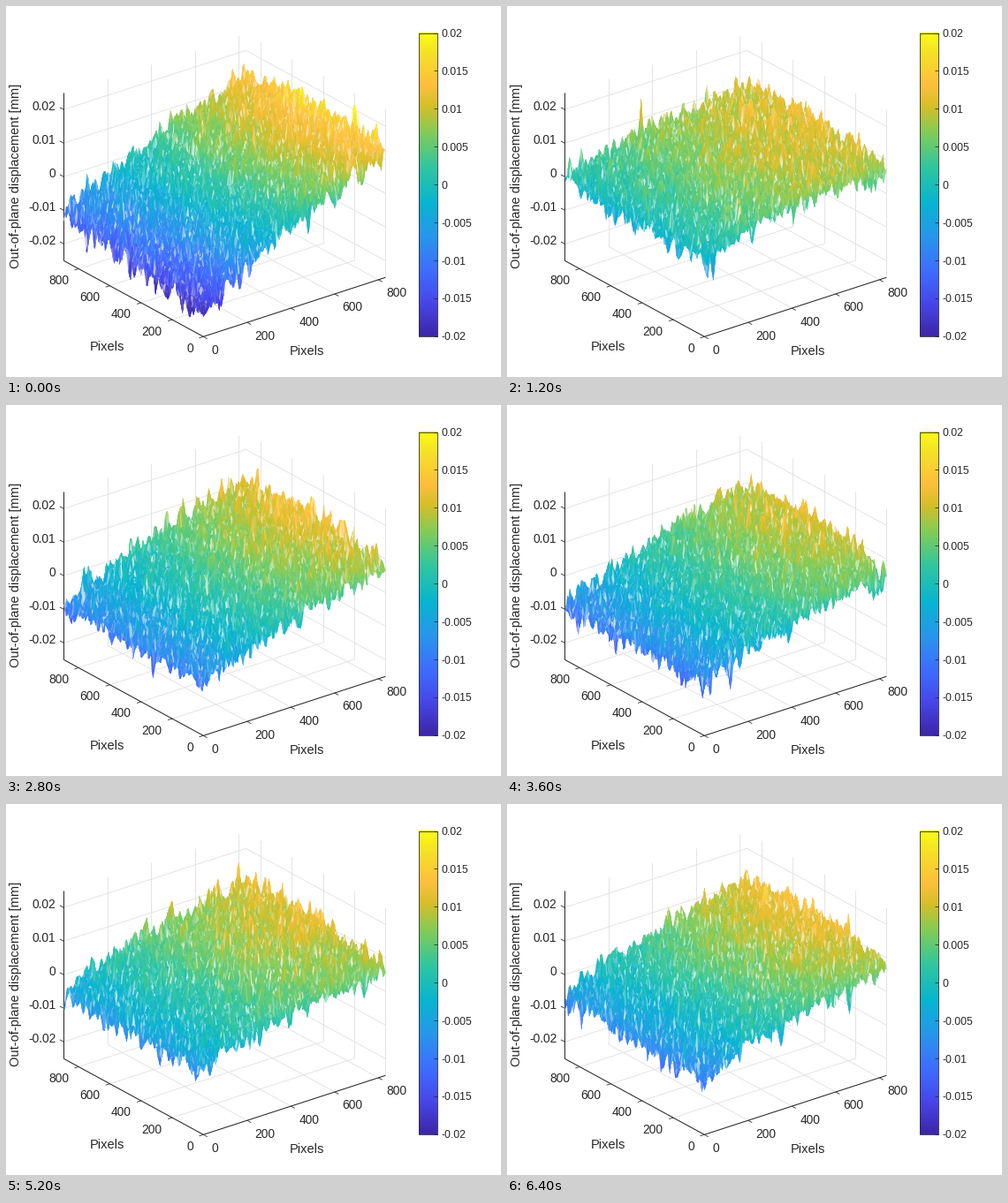
A matplotlib script for the animation above (6800 ms loop, 560 by 420 pixels).

```python
import numpy as np
import matplotlib.pyplot as plt
from matplotlib.animation import FuncAnimation
from matplotlib.collections import PolyCollection
from matplotlib.colors import LinearSegmentedColormap

W, H, DPI = 560, 420, 100
FRAMES, INTERVAL = 17, 400
PX = 72 / DPI
FONT = "Liberation Sans"
INK, GRID = "#262626", "#dedede"
X_MAX, Y_MAX, Z_MAX = 832, 896, 0.025
TICKS = range(0, 801, 200)
Z_TICKS = np.arange(-2, 3) / 100
NU, NV = 134, 126

PARULA = LinearSegmentedColormap.from_list("parula", [
    (0, "#3e26a8"), (0.11, "#4747eb"), (0.22, "#3e6fff"),
    (0.33, "#2797eb"), (0.44, "#08b5d0"), (0.56, "#31c69f"),
    (0.67, "#81cc59"), (0.76, "#d5bf28"), (0.83, "#febf3c"),
    (0.93, "#f6df29"), (1, "#f9fb15")])


def project(u, v, z=-Z_MAX):
    """Screen position of a point; u and v run from 0 to 1."""
    x = 223.3 + 206 * u - 158 * v
    y = 374.3 - 67 * u - 86 * v - (z + Z_MAX) * 3800
    return x, y


def line(*points, color=INK, width=0.8):
    x, y = zip(*points)
    ax.plot(x, y, color=color, lw=width * PX, zorder=1,
            solid_capstyle="butt")


def label(x, y, text, size=13.7, ha="left"):
    ax.text(x, y + 0.35 * size, text, size=size * PX, color=INK,
            ha=ha, va="baseline", family=FONT)


def tick(x, y, dx, dy):
    line((x, y), (x + dx, y + dy))


def draw_axes():
    for t in TICKS:
        u, v = t / X_MAX, t / Y_MAX
        line(project(u, 0), project(u, 1), color=GRID)
        line(project(u, 1), project(u, 1, Z_MAX), color=GRID)
        line(project(0, v), project(1, v), color=GRID)
        line(project(1, v), project(1, v, Z_MAX), color=GRID)
    for z in Z_TICKS:
        line(project(0, 1, z), project(1, 1, z), project(1, 0, z),
             color=GRID)

    line(project(1, 0), project(0, 0), project(0, 1), width=1)
    line(project(0, 1), project(0, 1, Z_MAX), width=1)
    for t in TICKS:
        x, y = project(t / X_MAX, 0)
        tick(x, y, 4.4, 2.4)
        label(x + 8.8, y + 14.7, str(t))
        x, y = project(0, t / Y_MAX)
        tick(x, y, -4.8, 1.5)
        label(x - 11.3, y + 12.7, str(t), ha="right")
    for z in Z_TICKS:
        x, y = project(0, 1, z)
        tick(x, y, -4.4, -2.4)
        label(x - 9, y - 3.6, f"{z:g}", ha="right")

    label(114.5, 385, "Pixels", 14.67, "center")
    label(340, 390, "Pixels", 14.67, "center")
    ax.text(15, 192.5, "Out-of-plane displacement [mm]", size=14.67 * PX,
            color=INK, rotation=90, rotation_mode="anchor", ha="center",
            va="baseline", family=FONT)


def draw_colorbar():
    left, right, top, bottom = 466.5, 487.5, 30.5, 373.5
    ax.imshow(np.linspace(1, 0, 256)[:, None], cmap=PARULA, aspect="auto",
              extent=(left, right, bottom + 0.5, top), zorder=0)
    line((left, top), (right, top), (right, bottom), (left, bottom),
         (left, top))
    for i in range(9):
        y = top + (bottom - top) * i / 8
        tick(right, y, -4, 0)
        label(492.3, y + 0.5, f"{0.02 - 0.005 * i:g}", 12.2)


def smooth(a):
    for axis in (0, 1):
        a = (np.roll(a, 1, axis) + 2 * a + np.roll(a, -1, axis)) / 4
    return a


def plane(k):
    """Mean surface in micrometres: a tilted sheet that swings and settles."""
    decay = np.exp(-k / 5)
    swing = (0.85 * decay + 0.13) * np.cos(2 * np.pi * k / 8)
    sway = np.exp(-k / 8) * np.sin(2 * np.pi * k / 12)
    beat = np.cos(2 * np.pi * 0.178 * k)
    front = -6.3 - 12 * swing
    left = -6.5 - 4 * swing + 6 * sway
    right = 6 + 5 * decay + 1.8 * beat
    back = 9.3 + 1.3 * beat
    return ((1 - U) * ((1 - V) * front + V * left)
            + U * ((1 - V) * right + V * back)
            + 3 * np.sin(np.pi * U) * (1 - 0.4 * V)
            + 3 * U * np.sin(np.pi * V))


def heights(k, rng):
    n = smooth(rng.normal(size=U.shape))
    n /= n.std()
    rim = np.minimum(np.minimum(U, 1 - U), np.minimum(V, 1 - V))
    n = (n + 0.1 * n * abs(n)) * (1 + 0.3 * np.exp(-rim / 0.03))
    return (plane(k) + 1.55 * n) / 1000


def corners(a):
    return np.stack([a[:-1, :-1], a[:-1, 1:], a[1:, 1:], a[1:, :-1]], -1)


def update(k):
    rng = np.random.default_rng(100 + k)
    z = heights(k, rng)
    x, y = project(U, V, z)
    quads = np.stack([corners(x), corners(y)], -1).reshape(-1, 4, 2)
    level = corners(z).mean(-1).ravel()
    rgb = PARULA((level + 0.02) / 0.04)[:, :3]
    # pale gaps of the mesh
    gap = 0.75 * rng.random((len(rgb), 1)) ** 7
    rgb += gap * (1 - rgb)
    surface.set_verts(quads)
    surface.set_facecolor(rgb)
    surface.set_edgecolor(rgb)
    return surface,


# far cells come first, so near ones cover them
V, U = np.meshgrid(np.linspace(1, 0, NV), np.linspace(1, 0, NU),
                   indexing="ij")

fig = plt.figure(figsize=(W / DPI, H / DPI), dpi=DPI, facecolor="white")
ax = fig.add_axes([0, 0, 1, 1])
draw_colorbar()
draw_axes()
ax.set_xlim(0, W)
ax.set_ylim(H, 0)
ax.axis("off")
surface = PolyCollection([], linewidths=0.3 * PX, zorder=3)
ax.add_collection(surface, autolim=False)

anim = FuncAnimation(fig, update, frames=FRAMES, interval=INTERVAL,
                     init_func=lambda: update(0), repeat=True,
                     repeat_delay=0)
plt.show()
```
